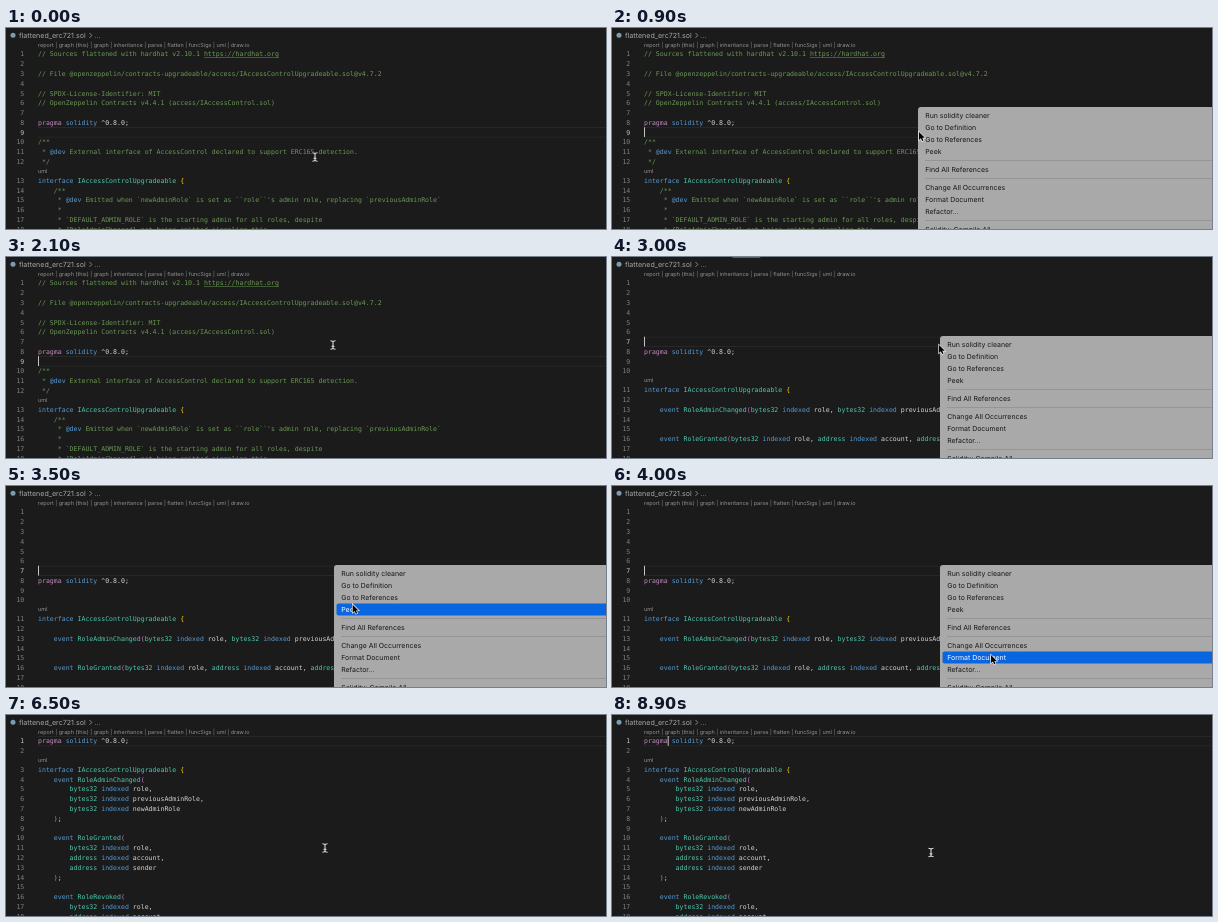
Write an HTML page with a canvas that moves like this. It is 600x201 px and loops after 9300 ms.

```html
<!DOCTYPE html>
<html lang="en">
<head>
<meta charset="utf-8">
<title>Solidity cleaner demo</title>
<style>
html, body { margin: 0; width: 600px; height: 201px; overflow: hidden; background: #1b1b1b; }
canvas { display: block; }
</style>
</head>
<body>
<canvas id="stage" width="600" height="201"></canvas>
<script>
const ctx = document.getElementById('stage').getContext('2d');
const LOOP = 9300;
const MONO = '"DejaVu Sans Mono", monospace', SANS = 'Inter, sans-serif';
const LEFT = 32, CHAR = 3.95, ROW = 9.79, LENS = 8.9, FIRST = 26;

const blank = n => Array(n).fill('');
const event = (name, ...args) => `    event ${name}(${args.join(', ')});`;
const tall = (name, ...args) =>
  [`    event ${name}(`, ...args.map((a, i) => `        ${a}${i < args.length - 1 ? ',' : ''}`), '    );', ''];

const pragma = 'pragma solidity ^0.8.0;';
const head = 'interface IAccessControlUpgradeable {';
const role = 'bytes32 indexed role';
const changed = ['RoleAdminChanged', role, 'bytes32 indexed previousAdminRole', 'bytes32 indexed newAdminRole'];
const granted = ['RoleGranted', role, 'address indexed account', 'address indexed sender'];
const revoked = ['RoleRevoked', ...granted.slice(1)];

const raw = [
  '// Sources flattened with hardhat v2.10.1 https://hardhat.org', '',
  '// File @openzeppelin/contracts-upgradeable/access/IAccessControlUpgradeable.sol@v4.7.2', '',
  '// SPDX-License-Identifier: MIT',
  '// OpenZeppelin Contracts v4.4.1 (access/IAccessControl.sol)', '',
  pragma, '',
  '/**',
  ' * @dev External interface of AccessControl declared to support ERC165 detection.',
  ' */',
  head,
  '    /**',
  "     * @dev Emitted when `newAdminRole` is set as ``role``'s admin role, replacing `previousAdminRole`",
  '     *',
  '     * `DEFAULT_ADMIN_ROLE` is the starting admin for all roles, despite',
  '     * {RoleAdminChanged} not being emitted signaling this.'
];
const cleaned = [...blank(7), pragma, '', '', head, '', event(...changed), '', '', event(...granted), '', ''];
const formatted = [pragma, '', head, ...tall(...changed), ...tall(...granted), ...tall(...revoked)];

const docs = [
  { until: 2400, lines: raw, active: 9, col: 0 },
  { until: 5600, lines: cleaned, active: 7, col: 0 },
  { until: LOOP, lines: formatted, active: 1, col: 6 }
];

const items = ['Run solidity cleaner', 'Go to Definition', 'Go to References', 'Peek', '-',
  'Find All References', '-', 'Change All Occurrences', 'Format Document', 'Refactor...', '-',
  'Solidity: Compile All'];
const menus = [
  { from: 700, fade: 1980, to: 2090, x: 306 },
  { from: 2800, fade: 4420, to: 4560, x: 328 }
];
const bars = [[2650, 3500], [4950, 5600]];
const path = [
  [0, 309, 129], [100, 309, 129], [550, 307, 104], [1150, 307, 104], [1550, 327, 88],
  [3250, 327, 88], [3850, 379, 169], [4600, 379, 170], [5300, 319, 133],
  [6500, 319, 133], [6850, 319, 137.5], [LOOP, 319, 137.5]
];

const within = (t, a, b) => t >= a && t < b;

// Glyphs are laid out large and scaled down, which keeps their advances fractional.
function text(s, x, y, size, color, family = SANS, align = 'left') {
  ctx.save();
  ctx.translate(x, y + size * 0.36);
  ctx.scale(0.1, 0.1);
  ctx.font = `${size * 10}px ${family}`;
  ctx.textRendering = 'geometricPrecision';
  ctx.textAlign = align;
  ctx.fillStyle = color;
  ctx.fillText(s, 0, 0);
  ctx.restore();
}

function box(x, y, w, h, color, r = 0) {
  ctx.fillStyle = color;
  ctx.beginPath();
  ctx.roundRect(x, y, w, h, r);
  ctx.fill();
}

function tokenColor(s, comment) {
  if (comment) return s === '@dev' ? '#569cd6' : '#6a9955';
  if (s === 'pragma') return '#c586c0';
  if (/^(solidity|interface|event|indexed)$/.test(s)) return '#569cd6';
  if (/^(bytes32|address|[A-Z]\w+)$/.test(s)) return '#4ec9b0';
  if (s === '{') return '#ffd700';
  if (/[()]/.test(s)) return '#da70d6';
  return '#d4d4d4';
}

function codeLine(line, y) {
  const comment = /^\s*[/*]/.test(line);
  let x = LEFT;
  for (const s of line.split(comment ? /(\s+)/ : /(\s+|[{}(),;])/)) {
    if (s.trim()) {
      const color = tokenColor(s, comment);
      text(s, x, y, 6.56, color, MONO);
      if (s.startsWith('http')) box(x, y + 3.4, s.length * CHAR, 0.7, color);
    }
    x += s.length * CHAR;
  }
}

function editor(doc, t) {
  ctx.fillStyle = '#7b9cb0';
  ctx.beginPath();
  ctx.arc(7, 7.2, 2.5, 0, 7);
  ctx.fill();
  text('flattened_erc721.sol', 13, 7, 7.1, '#a9a9a9');
  ctx.strokeStyle = '#a0a0a0';
  ctx.lineWidth = 0.8;
  ctx.beginPath();
  ctx.moveTo(83.5, 5); ctx.lineTo(85.8, 7.4); ctx.lineTo(83.5, 9.8);
  ctx.stroke();
  text('...', 88.5, 7, 7.1, '#a9a9a9');
  text('report | graph (this) | graph | inheritance | parse | flatten | funcSigs | uml | draw.io',
    LEFT, 16.6, 5.5, '#929292');

  let y = FIRST;
  doc.lines.forEach((line, i) => {
    const active = i + 1 === doc.active;
    if (line === head) {
      text('uml', LEFT, y - 0.5, 5.5, '#929292');
      y += LENS;
    }
    if (active) {
      box(LEFT, y - 5, 568, 0.8, '#2b2b2b');
      box(LEFT, y + 4.4, 568, 0.8, '#2b2b2b');
    }
    text(i + 1, 18.3, y, 6.56, active ? '#c6c6c6' : '#808080', MONO, 'right');
    codeLine(line, y);
    if (active && caretOn(t)) box(LEFT + doc.col * CHAR, y - 5, 1, 9.8, '#c4c4c4');
    y += ROW;
  });
}

function caretOn(t) {
  if (t < 4400) return t >= 500 && !within(t, 2200, 2400);
  return Math.floor((t - 3900) / 500) % 2 === 0 && t >= 4900;
}

function progress(t) {
  for (const [from, to] of bars) {
    if (within(t, from, to)) box((t - from) * 0.343, 0, 28, 1, '#0e70c0');
  }
}

function menu(m, t, mouse) {
  ctx.save();
  ctx.globalAlpha = Math.min(1, (m.to - t) / (m.to - m.fade));
  box(m.x, 79, 320, 140, '#a9a9a9', 3);
  let y = 81.5;
  for (const item of items) {
    if (item === '-') {
      box(m.x + 7, y + 2.7, 300, 0.8, '#8f8f8f');
      y += 6;
      continue;
    }
    const hover = mouse.x > m.x + 3 && within(mouse.y, y, y + 12);
    if (hover) box(m.x + 2.5, y, 312, 12, '#0a66e0', 2);
    text(item, m.x + 7.2, y + 6.1, 6.95, hover ? '#fff' : '#161616');
    y += 12;
  }
  ctx.restore();
}

function mouseAt(t) {
  const i = path.findIndex(p => p[0] > t);
  const [t0, x0, y0] = path[i - 1], [t1, x1, y1] = path[i];
  const p = (t - t0) / (t1 - t0), e = p * p * (3 - 2 * p);
  return { x: x0 + (x1 - x0) * e, y: y0 + (y1 - y0) * e };
}

function arrow({ x, y }) {
  const shape = new Path2D('M0 0V8L1.9 6.3L3.1 9.1L4.5 8.5L3.3 5.8H5.8Z');
  ctx.save();
  ctx.translate(x, y);
  ctx.lineWidth = 1.3;
  ctx.strokeStyle = '#f0f0f0';
  ctx.stroke(shape);
  ctx.fillStyle = '#000';
  ctx.fill(shape);
  ctx.restore();
}

function beam({ x, y }) {
  const shape = new Path2D('M-2.6 -4.2Q0 -4.2 0 -2.8Q0 -4.2 2.6 -4.2M0 -3V3M-2.6 4.2Q0 4.2 0 2.8Q0 4.2 2.6 4.2M-1.4 1.4H1.4');
  ctx.save();
  ctx.translate(x, y);
  for (const [width, color] of [[2, '#111'], [1.1, '#dcdcdc']]) {
    ctx.lineWidth = width;
    ctx.strokeStyle = color;
    ctx.stroke(shape);
  }
  ctx.restore();
}

function draw(now) {
  const t = now % LOOP, mouse = mouseAt(t);
  box(0, 0, 600, 201, '#1b1b1b');
  editor(docs.find(d => t < d.until), t);
  progress(t);
  const open = menus.find(m => within(t, m.from, m.to));
  if (open) menu(open, t, mouse);
  (open ? arrow : beam)(mouse);
}

const start = performance.now();
function tick() {
  draw(performance.now() - start);
  requestAnimationFrame(tick);
}
tick();
</script>
</body>
</html>
```
